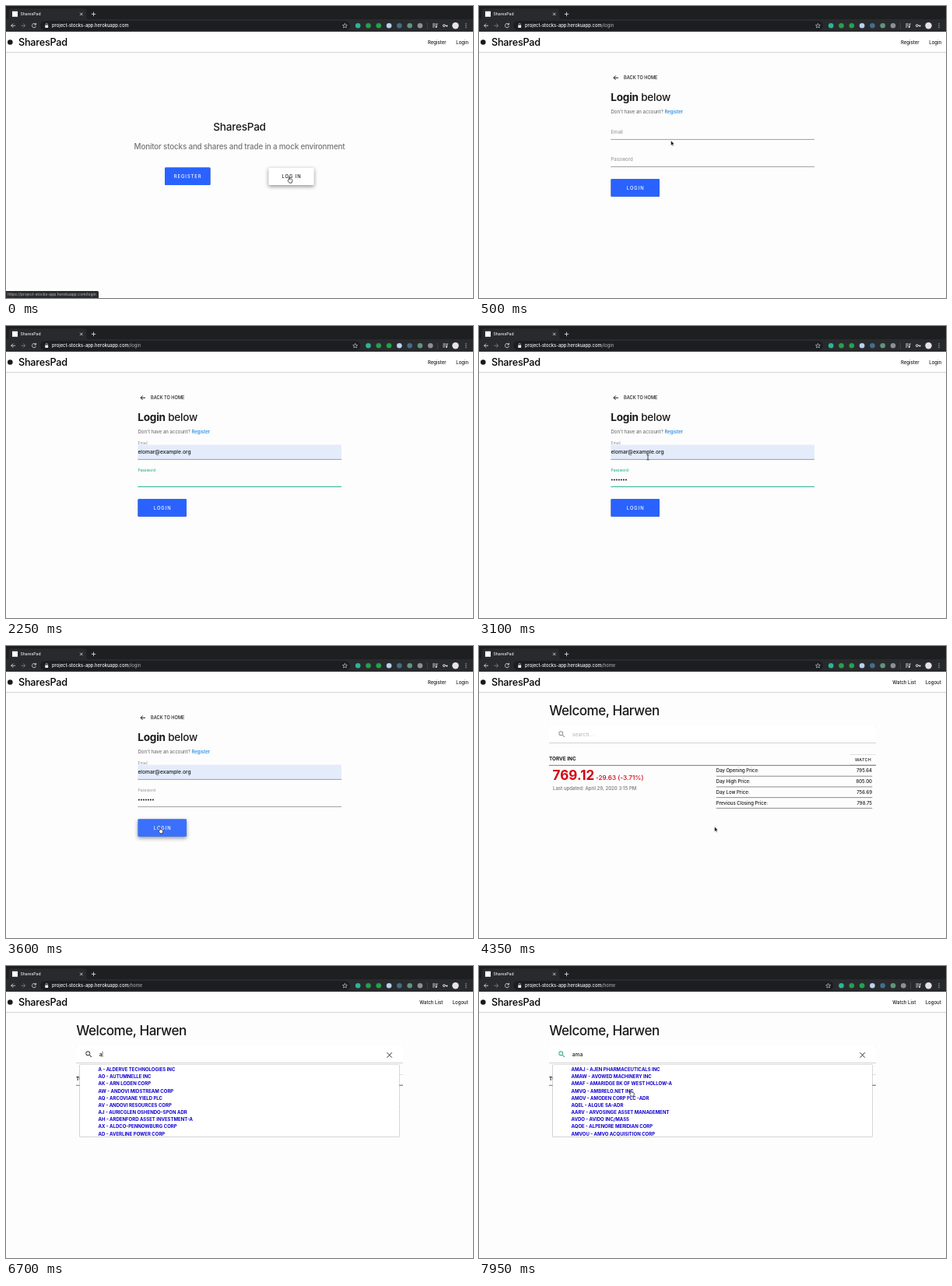
These frames come from a looping animation (600 px wide and 375 px high, 8000 ms). An HTML page:

```html
<!DOCTYPE html>
<html lang="en">
<head>
<meta charset="utf-8">
<title>SharesPad</title>
<style>
  html, body { margin: 0; width: 100%; height: 100%; overflow: hidden; background: #fdfdfd; }
  svg { display: block; width: 600px; height: 375px; font: 450 6px Inter, "Open Sans", sans-serif; fill: #1a1a1a; }
  text { white-space: pre; }
  .line { fill: none; stroke: currentColor; stroke-width: 1; }
  .low { filter: drop-shadow(0 0 .4px rgba(0, 0, 0, .2)) drop-shadow(0 .9px .6px rgba(0, 0, 0, .5)); }
  .high { filter: drop-shadow(0 .4px .6px rgba(0, 0, 0, .2)) drop-shadow(0 2.4px 2.6px rgba(0, 0, 0, .42)); }
  .mid { text-anchor: middle; }
  .end { text-anchor: end; }
  .cta { font-size: 5.83px; letter-spacing: .95px; text-anchor: middle; }
  .blue { fill: #2962ff; }
  .grey { fill: #757575; }
  .bold { font-weight: 700; }
  .field { font-size: 6.7px; }
  .mail { font-size: 5.5px; font-weight: 500; fill: #f1f1f1; }
  .hit { font-weight: 700; fill: #0f00cf; }
  .red { fill: #d50012; }
</style>
</head>
<body>
<svg viewBox="0 0 600 375">
  <defs>
    <path id="arrow" d="M0 0V6.4L1.5 5.1 2.5 7.3 3.5 6.9 2.6 4.7H4.6Z" fill="#111" stroke="#fff" stroke-width=".5"/>
    <path id="hand" d="M1.5 4.4V.8Q2.1 0 2.7 .8V3Q3.4 2.5 3.9 3.2 4.6 2.7 5 3.4 5.8 3.1 6 4V5.6L5.3 8H2.3L.2 5.1Q.2 4 1.5 4.4Z" fill="#fff" stroke="#111" stroke-width=".7"/>
    <path id="ibeam" d="M-1.5-3.2Q0-3.2 0-2.4 0-3.2 1.5-3.2M0-2.4V2.6M-1.5 3.4Q0 3.4 0 2.6 0 3.4 1.5 3.4" fill="none" stroke="#222" stroke-width=".8"/>
  </defs>

  <rect width="600" height="375" fill="#fdfdfd"/>

  <!-- landing page -->
  <g data-on="0-250">
    <text class="mid" x="300" y="159.7" font-size="13.6" letter-spacing="-.25">SharesPad</text>
    <text class="mid grey" x="300" y="184.2" font-size="9.85" letter-spacing="-.18">Monitor stocks and shares and trade in a mock environment</text>
    <rect class="blue low" x="204" y="207.5" width="58.5" height="22.5" rx="1.2"/>
    <text class="cta" x="233.7" y="221.2" fill="#fff">REGISTER</text>
    <rect class="high" x="337.3" y="207.5" width="58.5" height="22.5" rx="1.2" fill="#fff"/>
    <text class="cta" x="367" y="221.2">LOG IN</text>
    <path d="M0 366H117.5Q119 366 119 367.5V375H0Z" fill="#2b2c2f"/>
    <text x="2" y="372.4" font-size="4.93" fill="#a5a9ae">https://project-stocks-app.herokuapp.com/login</text>
  </g>

  <!-- login page -->
  <g data-on="250-3800">
    <path class="line" d="M179 92.2H173M175.7 89.5 173 92.2 175.7 94.9" style="stroke-width:.9"/>
    <text x="186" y="94.2" font-size="5.65">BACK TO HOME</text>
    <text x="169.3" y="122.2" font-size="13.6" letter-spacing="-.25"><tspan class="bold">Login</tspan> below</text>
    <text class="grey" x="169.5" y="138" font-size="6">Don't have an account? <tspan fill="#1e88e5">Register</tspan></text>
    <text id="mailLabel">Email</text>
    <rect data-on="1650-3800" x="169.3" y="152.5" width="261.7" height="18.8" fill="#e4ecfb"/>
    <text id="mailText" class="field" x="169.4" y="164.1"/>
    <path id="mailLine" class="line" d="M169.3 171.4H431"/>
    <text id="passLabel">Password</text>
    <path id="dots" fill="none" stroke="#222" stroke-width="2.1" stroke-linecap="round" stroke-dasharray="0 3"/>
    <path id="passLine" class="line" d="M169.3 206.4H431"/>
    <rect id="loginBtn" x="169.5" y="222.3" width="62.5" height="22.5" rx="1.2"/>
    <text class="cta" x="201.2" y="236.1" fill="#fff">LOGIN</text>
    <g data-on="900-1850">
      <rect class="low" x="169.2" y="172" width="94.8" height="81.7" rx="1" fill="#242528"/>
      <rect data-on="1650-1850" x="169.2" y="190.5" width="94.8" height="15" fill="#3b3c40"/>
      <g id="mails"></g>
    </g>
  </g>

  <!-- account page -->
  <g data-on="3800-8000">
    <text x="90.3" y="88.8" font-size="17.1" letter-spacing="-.5">Welcome, Harwen</text>
    <rect class="low" x="90" y="102" width="420" height="22.5" rx=".8" fill="#fff"/>
    <path id="lens" transform="translate(101 108) scale(.45)" d="M15.5 14h-.79l-.28-.27A6.47 6.47 0 0 0 16 9.5 6.5 6.5 0 1 0 9.5 16c1.61 0 3.09-.59 4.23-1.57l.27.28v.79l5 4.99L20.49 19l-4.99-5zm-6 0C7.01 14 5 11.99 5 9.5S7.01 5 9.5 5 14 7.01 14 9.5 11.99 14 9.5 14z"/>
    <text data-on="3800-6550" class="field" x="119.7" y="115.8" fill="#bdbdbd">search...</text>
    <text id="query" class="field" x="119.7" y="115.8"/>
    <rect id="caret" y="109.5" width=".6" height="7.5"/>
    <path data-on="6550-8000" class="line" d="M489.5 111.2 495.9 117.7M495.9 111.2 489.5 117.7" color="#333"/>
    <g data-on="4050-8000">
      <text class="bold" x="90" y="146.6" font-size="6.4">TORVE INC</text>
      <rect class="low" x="477" y="139.3" width="33" height="13.4" rx=".8" fill="#fff"/>
      <text class="mid" x="493.5" y="148" font-size="5.4" letter-spacing=".25">WATCH</text>
      <path class="line" d="M90 153.3H510" color="#757575"/>
      <text class="bold red" x="94.6" y="172.2" font-size="17" letter-spacing=".05">769.12</text>
      <text class="red" x="150" y="172.2" font-size="8.2">-29.63 (-3.71%)</text>
      <text class="grey" x="95" y="185.4" font-size="6.1">Last updated: April 29, 2020 3:15 PM</text>
      <g id="prices"></g>
    </g>
    <g id="panel">
      <rect id="sheet" class="low" x="94.6" y="126.8" width="410.7" fill="#fff"/>
      <g data-on="6650-7500" id="hitsA"></g>
      <g data-on="7500-8000" id="hitsB"></g>
    </g>
  </g>

  <!-- site header -->
  <rect class="low" y="33" width="600" height="26.5" fill="#fff"/>
  <circle cx="5.3" cy="46.5" r="3.3"/>
  <text x="16" y="51.1" font-size="12.7" letter-spacing="-.25" fill="#000">SharesPad</text>
  <g data-on="0-3800"><text x="542" y="48.8">Register</text><text x="578.3" y="48.8">Login</text></g>
  <g data-on="3800-8000"><text x="531.3" y="48.8">Watch List</text><text x="573.7" y="48.8">Logout</text></g>

  <!-- browser window -->
  <rect width="600" height="33" fill="#292a2d"/>
  <rect width="600" height="17" fill="#1e1f21"/>
  <path d="M0 17Q3.5 17 3.5 13.5V6.5Q3.5 3.3 6.7 3.3H100Q103.3 3.3 103.3 6.5V13.5Q103.3 17 107 17Z" fill="#292a2d"/>
  <rect x="8" y="6.8" width="7" height="7" fill="#fff"/>
  <text x="18.5" y="12.1" font-size="5.1" fill="#e8eaed">SharesPad</text>
  <g class="line" color="#e8eaed" style="stroke-width:.8">
    <path d="M95 8.7 98.4 12.1M98.4 8.7 95 12.1M109.8 10.4H115.2M112.5 7.7V13.1"/>
    <path d="M12 25.2H6.6M9.2 22.6 6.6 25.2 9.2 27.8"/>
    <path d="M19.4 25.2H24.8M22.2 22.6 24.8 25.2 22.2 27.8" color="#85888d" stroke="#85888d"/>
    <path d="M38 23.4A2.6 2.6 0 1 0 38.5 26M38.5 21.9V24.1H36.3"/>
  </g>
  <rect id="pill" x="44" y="19.2" height="12" rx="6" fill="#1c1d20"/>
  <rect x="50.2" y="24.5" width="4" height="3.4" rx=".4" fill="#e8eaed"/>
  <path class="line" color="#e8eaed" d="M51 24.6V23.6A1.2 1.2 0 0 1 53.4 23.6V24.6" style="stroke-width:.6"/>
  <text x="59" y="27.2" font-size="5.8" fill="#f1f3f4">project-stocks-app.herokuapp.com<tspan id="route" fill="#9aa0a6"/></text>
  <g id="tools">
    <path d="M435.4 22.3 436.2 24.3 438.4 24.5 436.8 25.9 437.3 28 435.4 26.9 433.5 28 434 25.9 432.4 24.5 434.6 24.3Z" class="line" color="#dadce0" style="stroke-width:.6"/>
    <g id="addons"></g>
    <path d="M541.3 21V29.5" class="line" color="#5f6368" style="stroke-width:.5"/>
    <path d="M548 23H552.3M548 25H552.3M548 27H550.5M553.4 27V22.9H554.8" class="line" color="#e8eaed" style="stroke-width:.8"/>
    <circle cx="552.6" cy="27.1" r="1" fill="#e8eaed"/>
  </g>
  <g id="key" class="line" color="#e8eaed"><circle cx="562.8" cy="25.2" r="1.4"/><path d="M564.2 25.2H567.6M566.5 25V26.8"/></g>
  <circle cx="577.5" cy="25.2" r="4.2" fill="#e9e3e3"/>
  <path d="M591 22.8V27.7" stroke="#e8eaed" stroke-width="1.2" stroke-linecap="round" stroke-dasharray="0 2.4"/>

  <use id="cursor"/>
</svg>
<script>
const LOOP = 8000, STEP = 50;
const $ = id => document.getElementById(id);
const set = (id, attrs) => { for (const k in attrs) $(id).setAttribute(k, attrs[k]); };
const clamp = v => Math.max(0, Math.min(1, v));
const within = (t, a, b) => t >= a && t < b;
const mix = (a, b, p) => a + (b - a) * p;
const last = (steps, t) => steps.filter(s => s[0] <= t).pop();

const column = (id, cls, x, y, gap, rows) => {
  $(id).innerHTML += rows.map((r, i) => `<text class="${cls}" x="${x}" y="${y + i * gap}">${r}</text>`).join('');
};

const mails = ['elomar2047@mail.test', 'elomar@example.org', 'elomar@abc.test',
  'elomar2047+kv2@mail.test', 'elomar2047+kv3@mail.test'];
column('mails', 'mail', 174, 185, 15, mails);
column('prices', '', 304.8, 162.4, 13.75, ['Day Opening Price:', 'Day High Price:', 'Day Low Price:', 'Previous Closing Price:']);
column('prices', 'end', 505, 162.4, 13.75, ['795.64', '805.00', '756.69', '798.75']);
for (let i = 0; i < 4; i++)
  $('prices').innerHTML += `<path class="line" color="#8a8a8a" d="M304.8 ${167.2 + i * 13.7}H505.3"/>`;

column('hitsA', 'hit', 118.5, 135, 9.17, [
  'A - ALDERVE TECHNOLOGIES INC', 'AO - AUTUMNELLE INC', 'AK - ARN LODEN CORP',
  'AW - ANDOVI MIDSTREAM CORP', 'AQ - ARCOVIANE YIELD PLC', 'AV - ANDOVI RESOURCES CORP',
  'AJ - AURICGLEN OSHENDO-SPON ADR', 'AH - ARDENFORD ASSET INVESTMENT-A',
  'AX - ALDCO-PENNOWBURG CORP', 'AD - AVERLINE POWER CORP']);
column('hitsB', 'hit', 118.5, 135, 9.17, [
  'AMAJ - AJEN PHARMACEUTICALS INC', 'AMAW - AVOWED MACHINERY INC', 'AMAF - AMARIDGE BK OF WEST HOLLOW-A',
  'AMVQ - AMBRELO.NET INC', 'AMOV - AMODEN CORP PLC -ADR', 'AQEL - ALQUE SA-ADR',
  'AARV - ARVOSINGE ASSET MANAGEMENT', 'AVDO - AVIDO INC/MASS',
  'AQOE - ALPENORE MERIDIAN CORP', 'AMVOU - AMVO ACQUISITION CORP']);

$('addons').innerHTML = ['#2bb596', '#23a04a', '#1da548', '#b9d3ee', '#3f6f8d', '#5f937c', '#8b9095']
  .map((c, i) => `<circle cx="${452.2 + i * 13.3}" cy="25.2" r="3.3" fill="${c}"/>`).join('');

const emailSteps = [[0, ''], [900, 'e'], [1000, 'el'], [1100, 'elo'], [1350, 'elom'], [1650, mails[1]]];
const querySteps = [[0, ''], [6550, 'a'], [7200, 'am'], [7400, 'ama']];
const bulletTimes = [2300, 2350, 2400, 2500, 2700, 2800, 2900];

// time, x, y, pointer shape from that time on
const path = [
  [0, 361.8, 219.2, 'hand'], [250, 361.8, 219.2, 'arrow'], [600, 218, 161.3, 'ibeam'],
  [1400, 218, 161.3, ''], [3050, 218, 161.3, 'ibeam'], [3150, 216, 176, 'arrow'],
  [3450, 195.7, 232.8, 'hand'], [3800, 195.7, 232.8, 'arrow'], [3950, 195.7, 232.8, 'arrow'],
  [4300, 302.6, 232, 'arrow'], [4400, 302.6, 232, 'arrow'], [4650, 288.5, 133, 'arrow'],
  [4750, 288.5, 133, 'arrow'], [4850, 398, 142.5, 'arrow'], [4950, 398, 142.5, 'arrow'],
  [5150, 487.5, 164, 'arrow'], [5400, 180, 120, 'ibeam'], [5550, 118.6, 113.4, 'ibeam'],
  [6550, 118.6, 113.4, ''], [7650, 291, 205, 'hand'], [7900, 193.3, 159.3, 'hand'], [8000, 193.3, 159.3, 'hand']];

const timed = [...document.querySelectorAll('[data-on]')].map(el => [el, ...el.dataset.on.split('-').map(Number)]);
const GREEN = '#26b08f', GREY = '#9e9e9e';

function drawField(name, t, from, to, y) {
  const p = 1 - (1 - clamp((t - from) / 200)) ** 2;
  const focus = within(t, from, to);
  set(name + 'Label', {
    transform: `translate(169.5 ${mix(y, y - 11.8, p)}) scale(${mix(1, .8, p)})`,
    fill: focus ? GREEN : GREY
  });
  set(name + 'Line', { color: focus ? GREEN : GREY });
}

function drawCursor(t) {
  const i = path.findIndex((k, n) => n + 1 === path.length || t < path[n + 1][0]);
  const a = path[i], b = path[i + 1] || a;
  let p = clamp((t - a[0]) / (b[0] - a[0] || 1));
  p = p * p * (3 - 2 * p);
  set('cursor', {
    href: a[3] ? '#' + a[3] : '',
    visibility: a[3] ? 'visible' : 'hidden',
    transform: `translate(${mix(a[1], b[1], p)} ${mix(a[2], b[2], p)})`
  });
}

function draw(t) {
  for (const [el, a, b] of timed) el.style.display = within(t, a, b) ? '' : 'none';

  const keyed = !within(t, 850, 2400) && t < 7000;
  const shift = keyed ? 0 : 13.3;
  set('tools', { transform: `translate(${shift})` });
  set('pill', { width: 398 + shift });
  set('key', { visibility: keyed ? 'visible' : 'hidden' });
  $('route').textContent = t < 250 ? '' : t < 3800 ? '/login' : '/home';

  drawField('mail', t, 800, 2000, 164.1);
  drawField('pass', t, 2000, 3550, 199.1);
  $('mailText').textContent = last(emailSteps, t)[1];
  const n = bulletTimes.filter(b => b <= t).length;
  set('dots', { d: n ? `M170.9 197.5h${3 * n - 2.9}` : '' });
  const hover = t >= 3450;
  set('loginBtn', { class: hover ? 'high' : 'low', fill: hover ? '#3a70fb' : '#2962ff' });

  const query = last(querySteps, t)[1];
  $('query').textContent = query;
  set('lens', { fill: t >= 7400 ? '#1ea587' : t >= 5850 ? '#333' : '#8a8a8a' });
  set('caret', {
    x: 120 + [0, 3.7, 9.5, 13.2][query.length],
    visibility: within(t, 5850, 6300) || within(t, 6550, 7900) ? 'visible' : 'hidden'
  });
  set('panel', { opacity: clamp((t - 5800) / 350) });
  set('sheet', { height: t < 6650 ? 26 : 92.6 });

  drawCursor(t);
}

const start = performance.now();
function tick() {
  const t = (performance.now() - start) % LOOP;
  draw(Math.floor(t / STEP) * STEP);
  requestAnimationFrame(tick);
}
tick();
</script>
</body>
</html>
```
